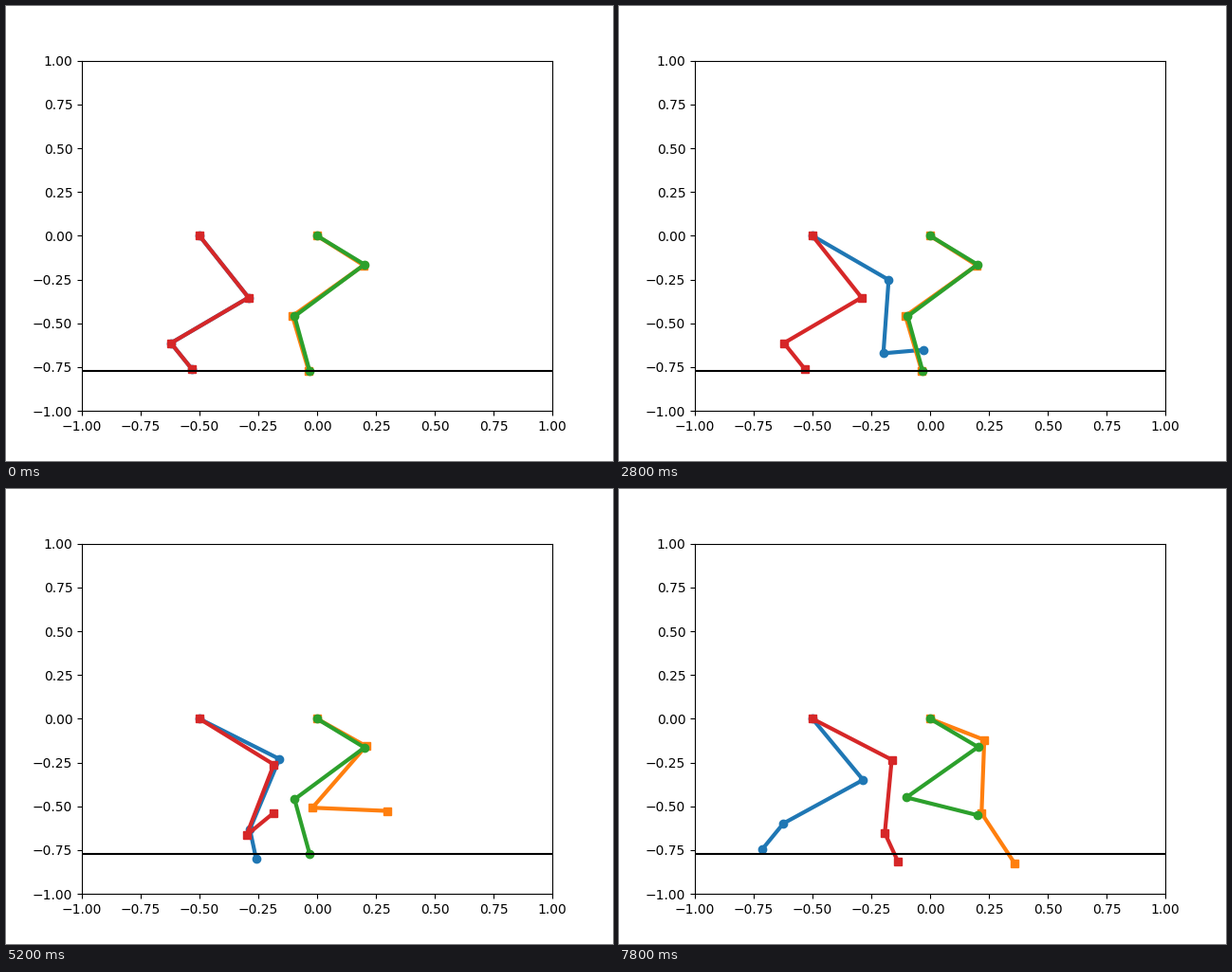
Write a matplotlib script that moves like this. It is 640 px wide and 480 px high and loops after 8000 ms.

```python
import numpy as np
import matplotlib.pyplot as plt
from matplotlib.animation import FuncAnimation

STEP = 200      # ms per frame
FRAMES = 40
LAG = 3200      # ms by which the second leg of a pair follows the first
GROUND = -0.77

# Segment lengths, from the hip down
HIND = (0.41, 0.42, 0.171)
FORE = (0.26, 0.419, 0.32)

# One list per segment: eased turns as (start ms, end ms, degrees)
HIND_TURNS = (
    [(800, 2200, 21), (2000, 5600, 4.5), (5400, 10400, -52)],
    [(500, 1700, 30), (1250, 4050, 32.3), (3500, 5700, -29), (4600, 8200, -36.5)],
    [(200, 1700, 115), (1550, 4250, -111), (2800, 8600, -70)],
)
FORE_TURNS = (
    [(4100, 7300, 12.8)],
    [(3300, 4400, -7), (4050, 6900, 57), (7000, 9000, -15)],
    [(3150, 5200, 75.5), (4900, 8700, -72)],
)


def ease(t, start, end):
    u = np.clip((t - start) / (end - start), 0, 1)
    return u * u * (3 - 2 * u)


def joints(hip, lengths, rest, turns, t):
    """Chain the segments; angles run from straight down towards the right."""
    x, y = [hip], [0]
    for length, angle, moves in zip(lengths, rest, turns):
        angle += sum(turn * ease(t, start, end) for start, end, turn in moves)
        x.append(x[-1] + length * np.sin(np.radians(angle)))
        y.append(y[-1] - length * np.cos(np.radians(angle)))
    return x, y


# Style, delay, hip x, lengths, rest angles, turns
HIND_LEG = (-0.5, HIND, (30.6, -51.8, 31), HIND_TURNS)
LEGS = [
    ("o-", 0, *HIND_LEG),
    ("s-", 0, 0, FORE, (49.6, -46.3, 12.5), FORE_TURNS),
    ("o-", LAG, 0, FORE, (50.8, -45.2, 11.6), FORE_TURNS),
    ("s-", LAG, *HIND_LEG),
]

fig, ax = plt.subplots(figsize=(6.4, 4.8), dpi=100)
ax.set(xlim=(-1, 1), ylim=(-1, 1))
lines = [ax.plot([], [], style, lw=3)[0] for style, *_ in LEGS]
ax.plot([-1, 1], [GROUND, GROUND], "k-")


def draw(frame):
    for line, (_, delay, *leg) in zip(lines, LEGS):
        line.set_data(*joints(*leg, frame * STEP - delay))
    return lines


anim = FuncAnimation(fig, draw, frames=FRAMES, interval=STEP, repeat=True,
                     repeat_delay=0)
plt.show()
```
